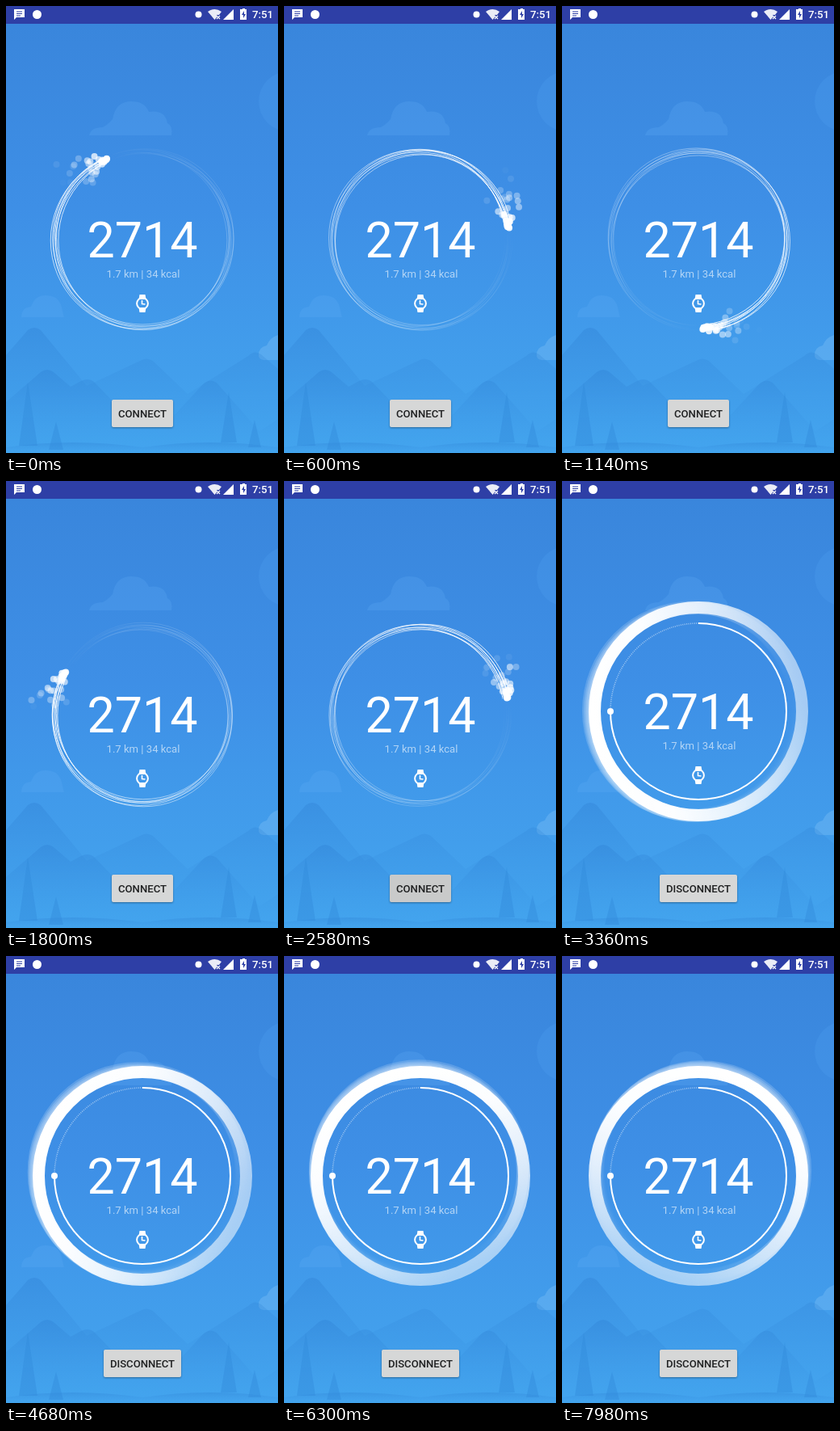
Recreate the animation shown at these times as an HTML page with a canvas. Size 337 px wide and 553 px high, loop 8 s.

```html
<!DOCTYPE html>
<html lang="en">
<head>
<meta charset="utf-8">
<title>Step counter</title>
<style>
  html, body { margin: 0; width: 100%; height: 100%; overflow: hidden; background: #3f91e6; }
  svg, canvas { position: absolute; left: 0; top: 0; width: 337px; height: 553px; display: block; }
  text { font-family: Roboto, Arial, sans-serif; text-anchor: middle; }
  #button { fill: #d6d7d7; filter: drop-shadow(0 1px 1px rgba(0, 0, 0, .35)); }
  #label { font-size: 13.1px; font-weight: 500; fill: #202122; }
</style>
</head>
<body>
<svg viewBox="0 0 337 553">
  <defs>
    <linearGradient id="sky" x2="0" y2="1">
      <stop offset="0" stop-color="#3985db"/>
      <stop offset=".45" stop-color="#3e8fe6"/>
      <stop offset="1" stop-color="#44a6ef"/>
    </linearGradient>
    <linearGradient id="hill" x2="0" y2="1">
      <stop offset="0" stop-color="#2c7cd0" stop-opacity=".32"/>
      <stop offset="1" stop-color="#3d9bea" stop-opacity=".05"/>
    </linearGradient>
  </defs>
  <rect width="337" height="553" fill="url(#sky)"/>
  <circle cx="350" cy="118" r="37" fill="#58a6f2" opacity=".2"/>
  <g fill="#5eaaf2" opacity=".26">
    <path d="M103 160q2-10 17-10 6-3 12-10 4-22 23-22 17 0 22 13 20-3 23 14 7 3 5 15z"/>
    <path d="M19 385q0-12 12-13 5-15 19-14 13 0 18 11l4 16z"/>
  </g>
  <path d="M313 432q0-10 10-12 4-10 14-13v31h-18q-6-1-6-6z" fill="#7fc0f6" opacity=".38"/>
  <g fill="url(#hill)">
    <path d="M0 432L27 401q8-6 16 0L100 470 166 439q8-5 16 0L225 480 300 433q8-8 16-2l21 18V553H0z"/>
    <path d="M0 490L43 453q8-6 16 0l21 18 13-7q8-4 15 0l42 43 56 2 38-41q8-8 17-2l53 60 23-15V553H0z"/>
    <path d="M0 546q80-12 170 0 80-12 167 0v7H0z"/>
  </g>
  <g fill="#2f86d8" opacity=".35">
    <path d="M27 466l12 78H16z"/>
    <path d="M62 514l9 35H53z"/>
    <path d="M276 478l10 62h-20z"/>
    <path d="M308 512l8 34h-16z"/>
  </g>
</svg>

<canvas id="rings"></canvas>

<svg viewBox="0 0 337 553">
  <rect width="337" height="22" fill="#2e3fa6"/>
  <g fill="#fff">
    <path d="M10 4h13v10H13l-3 3z"/>
    <path d="M13 7h7M13 9.5h7M13 12h5" stroke="#2e3fa6" stroke-width="1.2"/>
    <circle cx="38.500" cy="10.500" r="5.500"/>
    <circle cx="238.500" cy="10.500" r="4"/>
    <path d="M250 7q8.500-6 17 0l-3 4h-3v3l-2.500 3z" opacity=".9"/>
    <path d="M261 12l4 4m0-4l-4 4" stroke="#fff" stroke-width="1.2"/>
    <path d="M282 4v13h-13z"/>
    <path d="M291.500 4h1.500V3h3v1h2v13h-8V4z"/>
    <path d="M295 6l-3 5h2v4l3-5h-2z" fill="#2e3fa6"/>
    <text x="318" y="15" font-size="13.300" font-weight="500">7:51</text>
  </g>
  <g id="content" fill="#fff">
    <text x="169" y="311" font-size="61">2714</text>
    <text x="170" y="336" font-size="13.100" opacity=".6">1.7 km | 34 kcal</text>
    <path d="M165.500 357h7l1 6h-9zM165.500 379h7l1-6h-9z"/>
    <g fill="none" stroke="#fff">
      <circle cx="169" cy="368" r="6.900" stroke-width="2"/>
      <path d="M168.500 364v4.500l4 .5" stroke-width="1.600"/>
    </g>
  </g>
  <rect id="button" y="487" height="34" rx="2"/>
  <text id="label" x="169" y="509"></text>
</svg>

<script>
const LOOP = 8000, CX = 169, RADIUS = 109, TAU = Math.PI * 2;
const PRESS = 2480, SWITCH = 2700;
const HEAD_PATH = [[0, 336], [1140, 536.5], [1800, 658], [2580, 799], [3400, 947]];

const $ = id => document.getElementById(id);
const canvas = $('rings'), ctx = canvas.getContext('2d');
const scale = window.devicePixelRatio || 1;
canvas.width = Math.round(337 * scale);
canvas.height = Math.round(553 * scale);

const clamp = v => Math.min(1, Math.max(0, v));
const span = (t, from, to) => clamp((t - from) / (to - from));
const smooth = v => (1 - Math.cos(Math.PI * v)) / 2;
const white = a => `rgba(255,255,255,${a})`;
// Degrees clockwise from the top, to canvas radians.
const rad = deg => (deg - 90) * Math.PI / 180;
const random = n => {
  const v = Math.sin(n * 127.1 + 11.7) * 43758.5453;
  return v - Math.floor(v);
};

function headAngle(t) {
  let i = 1;
  while (i < HEAD_PATH.length - 1 && t > HEAD_PATH[i][0]) i++;
  const [t0, a0] = HEAD_PATH[i - 1], [t1, a1] = HEAD_PATH[i];
  return a0 + (a1 - a0) * (t - t0) / (t1 - t0);
}

function circle(x, y, r, from = 0, to = TAU) {
  ctx.beginPath();
  ctx.arc(x, y, r, from, to);
}

function dot(x, y, r, alpha) {
  ctx.fillStyle = white(alpha);
  circle(x, y, r);
  ctx.fill();
}

function drawTrail(head, cy) {
  const fade = ctx.createConicGradient(rad(head), CX, cy);
  [[0, 0], [.08, .04], [.3, .2], [.6, .46], [1, .9]].forEach(([at, a]) => fade.addColorStop(at, white(a)));
  ctx.strokeStyle = fade;
  ctx.lineWidth = 1;
  for (let i = 0; i < 7; i++) {
    const turn = i * TAU / 7 + head * .006;
    const shift = 2.2 + 2.4 * random(i + 3);
    circle(CX + shift * Math.cos(turn), cy + shift * Math.sin(turn), RADIUS + random(i) * 1.6 - .8);
    ctx.stroke();
  }
}

function drawSparks(t, head, cy) {
  const count = 26, life = 460;
  for (let i = 0; i < count; i++) {
    const clock = t / life + i / count + 5;
    const age = clock % 1, seed = i * 31 + Math.floor(clock) * 7;
    const angle = rad(head - age * (20 + 12 * random(seed)) + 3 * random(seed + 1) - 1);
    const r = RADIUS + age * (random(seed + 2) * 58 - 20) + random(seed + 3) * 5 - 2;
    dot(CX + r * Math.cos(angle), cy + r * Math.sin(angle), 4, .95 * (1 - age) ** 1.1);
  }
  for (const lag of [0, 2, 4]) {
    const a = rad(head - lag);
    dot(CX + RADIUS * Math.cos(a), cy + RADIUS * Math.sin(a), 4, .95);
  }
}

function drawBand(x, y, dx, dy, near, far) {
  const shade = ctx.createLinearGradient(x + dx * 130, y + dy * 130, x - dx * 130, y - dy * 130);
  shade.addColorStop(0, white(near));
  shade.addColorStop(.3, white(near * .94 + far * .06));
  shade.addColorStop(1, white(far));
  ctx.strokeStyle = shade;
  ctx.lineWidth = 15;
  circle(x, y, 128.5);
  ctx.stroke();
}

function drawConnected(t, cy) {
  const angle = 260 + (t - 3360) * .0255;
  for (let i = 1; i <= 4; i++) {
    const a = rad(angle + (i - 2.5) * 9);
    const dx = Math.cos(a), dy = Math.sin(a);
    drawBand(CX + dx * i * 2, cy + dy * i * 2, dx, dy, .17, 0);
  }
  drawBand(CX, cy, Math.cos(rad(angle)), Math.sin(rad(angle)), 1, .54);

  ctx.strokeStyle = '#fff';
  ctx.lineWidth = 2;
  circle(CX, cy, RADIUS, rad(0), rad(270));
  ctx.stroke();
  ctx.strokeStyle = white(.5);
  ctx.lineWidth = 1.6;
  ctx.setLineDash([1, 1.4]);
  circle(CX, cy, RADIUS, rad(270), rad(360));
  ctx.stroke();
  ctx.setLineDash([]);
  dot(CX - RADIUS, cy, 4, 1);
}

function drawButton(t) {
  const connected = t >= SWITCH, width = connected ? 96 : 76;
  $('button').setAttribute('x', 169 - width / 2);
  $('button').setAttribute('width', width);
  $('button').style.fill = t >= PRESS && !connected ? '#c9caca' : '#d6d7d7';
  $('label').textContent = connected ? 'DISCONNECT' : 'CONNECT';
}

function frame(now) {
  const t = now % LOOP;
  const lift = -17 * smooth(span(t, 3200, 3700));
  const cy = 289 + lift;
  const trail = 1 - span(t, 2700, 3050), ring = span(t, 2850, 3250);
  const head = headAngle(t);

  ctx.setTransform(scale, 0, 0, scale, 0, 0);
  ctx.clearRect(0, 0, 337, 553);
  if (trail > 0) {
    ctx.globalAlpha = trail;
    drawTrail(head, cy);
    drawSparks(t, head, cy);
  }
  if (ring > 0) {
    ctx.globalAlpha = ring;
    drawConnected(t, cy);
  }
  $('content').setAttribute('transform', `translate(0 ${lift})`);
  drawButton(t);
}

const start = performance.now();
function tick() {
  frame(performance.now() - start);
  requestAnimationFrame(tick);
}
tick();
</script>
</body>
</html>
```
